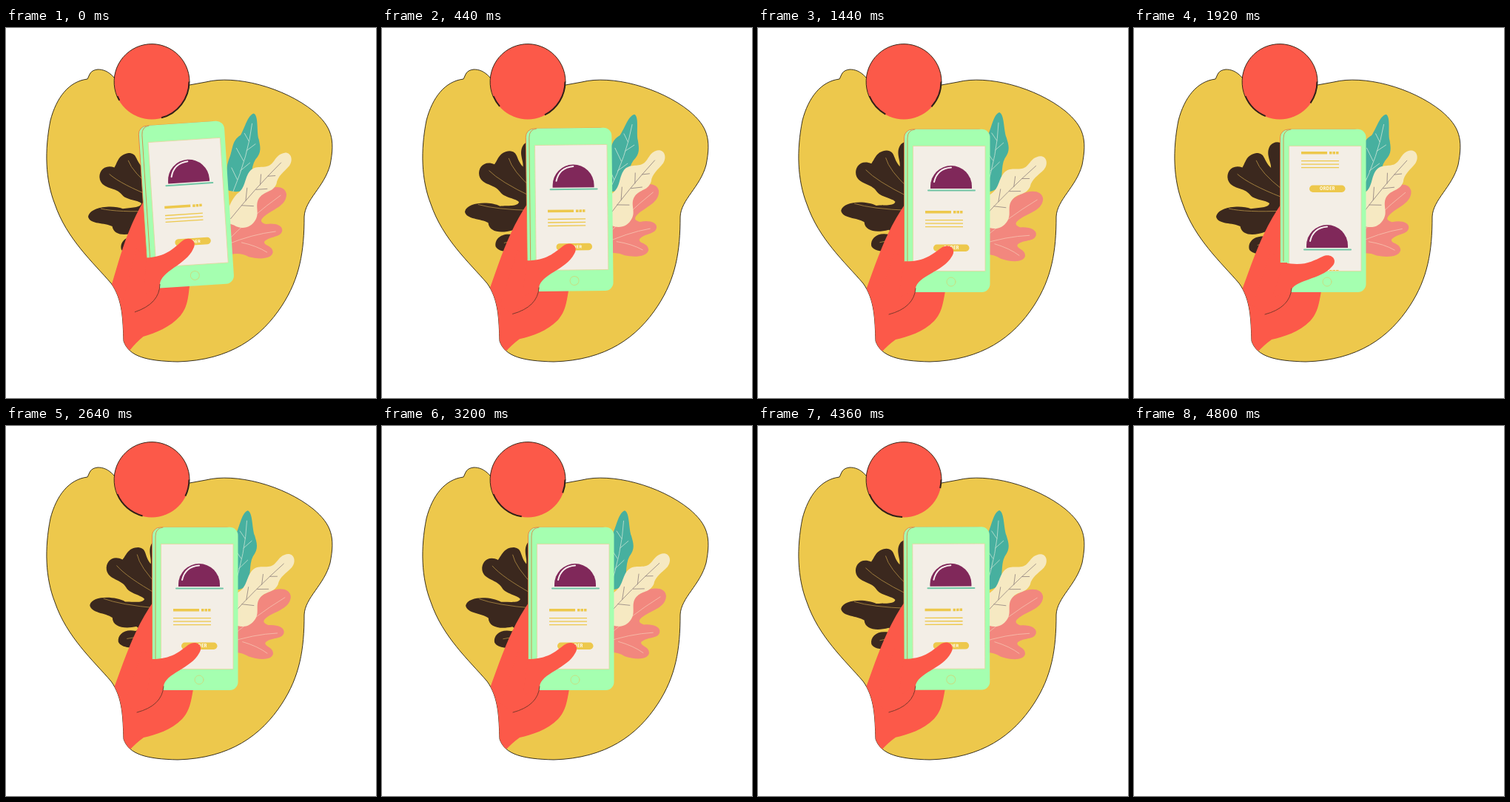
An HTML page that plays this animation: 500 by 500 pixels, repeating every 4.84 s.

```html
<!DOCTYPE html>
<html>
<head>
<meta charset="utf-8">
<style>
  html, body { margin: 0; width: 100%; height: 100%; overflow: hidden; background: #fff; }
  svg { display: block; width: 100vw; height: 100vh; }
  .line { fill: none; stroke-linecap: round; }
</style>
</head>
<body>
<svg viewBox="0 0 500 500">
  <defs>
    <path id="blob" d="M150,72C140,58 131,56 124,56C113,57 113,64 110,69C85,72 68,94 60,125C52,165 53,205 66,238C82,285 118,317 142,345C158,367 158,395 159,423C166,444 190,450 232,451C303,449 345,418 373,375C397,338 403,302 403,255C404,232 430,215 438,185C445,150 440,133 415,112C375,80 310,63 270,73L248,77Z"/>
    <clipPath id="blobClip"><use href="#blob"/></clipPath>
    <clipPath id="screenClip"><rect x="210" y="160" width="96.500" height="168"/></clipPath>
    <g id="item">
      <path fill="#80285a" d="M233,217V214A28,28 0 0 1 289,214V217Z"/>
      <path class="line" stroke="#f8eeee" stroke-width="2" d="M238,208Q242,190 261,188.500"/>
      <path class="line" stroke="#70c6a5" stroke-width="2" d="M230,219.500H293"/>
      <g fill="#edc84c">
        <path d="M226,247h35v3.500h-35zM264,247h3.500v3.500h-3.500zM268.500,247h3.500v3.500h-3.500zM273,247h3.500v3.500h-3.500z"/>
        <path d="M226,259h51v1.300h-51zM226,263.500h51v1.300h-51zM226,268h51v1.300h-51z"/>
        <rect x="237" y="292.500" width="48.500" height="9.500" rx="4.700"/>
      </g>
      <text x="261.500" y="299.200" text-anchor="middle" font-family="Inter, sans-serif" font-size="5.500" font-weight="700" letter-spacing=".4" fill="#fff">ORDER</text>
    </g>
  </defs>

  <g id="scene">
    <use href="#blob" fill="#edc84c" stroke="#251f10" stroke-width=".9"/>

    <g id="brown">
      <path fill="#3b281e" d="M230,275L222,160Q212,148 202,156C193,166 200,178 198,186C189,174 194,165 182,163C168,163 166,172 160,179C147,172 137,181 138,192C140,206 158,205 164,217C168,225 185,228 188,233C186,239 173,236 162,236C149,228 118,226 114,239C115,250 135,250 144,257C144,270 160,273 176,270Q182,273 175,276C160,272 150,280 151,290C155,299 170,299 195,300Z"/>
      <path class="line" stroke="#a3813f" stroke-width=".9" d="M152,187Q165,203 205,227M180,173Q183,190 208,217M133,231Q155,240 205,246M163,286L200,281"/>
    </g>

    <g id="teal">
      <path fill="#47b09f" d="M325,114C317,117 315,134 310,145C298,154 302,166 297,180C293,196 300,207 297,220Q312,225 325,216C332,203 327,188 333,176C341,165 338,158 335,148C331,139 332,116 325,114Z"/>
      <path class="line" stroke="#b8ddce" stroke-width=".9" d="M307,222Q323,170 324,128M311,205L302,190M314,193L326,181M317,179L306,163M320,165L331,155M322,152L315,142"/>
    </g>

    <g id="pink">
      <path fill="#f2877e" d="M295,310L300,260Q335,236 356,225C370,219 385,220 386,232C385,246 370,250 357,257C349,262 345,266 355,270C366,269 378,273 376,281C373,290 360,286 351,293C348,299 362,299 361,309C358,319 339,316 328,312Q312,302 295,310Z"/>
      <path class="line" stroke="#f6bcaa" stroke-width=".9" d="M295,293Q337,257 378,233M300,293Q335,282 367,281M320,292Q340,298 353,308"/>
    </g>

    <g id="cream">
      <path fill="#f6e9c2" d="M295,262Q301,237 314,225C326,218 325,206 332,197C340,187 350,193 359,190C368,187 369,175 382,174C391,174 393,185 387,192C379,200 370,205 368,215C362,227 352,223 344,232C336,241 343,252 337,261C329,274 315,273 307,267Z"/>
      <path class="line" stroke="#9b8d86" stroke-width=".9" d="M303,258Q337,221 376,187M319,241L335,243M325,235L328,218M340,221L355,221M346,215L348,201M357,204L367,204"/>
    </g>

    <g clip-path="url(#blobClip)">
      <g id="hand">
        <path fill="#fc5949" d="M130,390C152,350 162,290 200,236L254,350C250,372 249,384 238,396C223,411 203,417 186,421Q176,428 165,440L140,440Z"/>
        <rect x="197.500" y="137" width="112" height="219" rx="11" fill="#a5ffb0" stroke="#f0703f" stroke-width=".8"/>
        <rect x="201.500" y="136.700" width="112" height="220.300" rx="11" fill="#a5ffb0"/>
        <path class="line" stroke="#d77b3d" stroke-width=".8" d="M202,315V149Q202,138 212,137"/>
        <rect x="209.500" y="159.500" width="97.500" height="169" fill="#f3eee6" stroke="#e4d59c" stroke-width=".8"/>
        <g clip-path="url(#screenClip)">
          <g id="list"><use href="#item"/><use href="#item" y="160"/></g>
        </g>
        <circle class="line" cx="261" cy="343" r="6" stroke="#c4df85"/>
        <path fill="#fc5949" d="M185,300L197,317L207,317L213,352Q211,376 177,387L160,375Z"/>
        <path id="thumb" fill="#fc5949" d="M197,315C224,315 234,305 246,296C257,288 268,297 261,307C250,328 215,334 213,352L190,365Z"/>
        <path class="line" stroke="#713629" stroke-width=".9" d="M213,352Q211,378 177,387"/>
      </g>
    </g>

    <circle cx="197" cy="72.500" r="51" fill="#fc5949"/>
    <path class="line" stroke="#251f10" stroke-width=".9" d="M150,92.400A51,51 0 1 1 248,72.500"/>
    <circle id="ring" cx="197" cy="72.500" r="50.500" pathLength="360" fill="none" stroke="#302018" stroke-width="2"/>
  </g>
</svg>

<script>
const LOOP = 4840, STEP = 40, PITCH = 160;
const $ = id => document.getElementById(id);
const rotate = (id, angle, x, y) => $(id).setAttribute('transform', `rotate(${angle} ${x} ${y})`);

// Eased 0 to 1 between two times
function ramp(t, from, to) {
  const k = Math.min(1, Math.max(0, (t - from) / (to - from)));
  return k * k * (3 - 2 * k);
}

// Cosine with its crest at the given time
const wave = (t, period, crest) => Math.cos(2 * Math.PI * (t - crest) / period);

function draw(t) {
  $('scene').style.display = t >= LOOP - STEP ? 'none' : '';

  const sway = .45 + .6 * wave(t, 1700, 2050);
  rotate('teal', 8.7 * sway, 315, 220);
  rotate('cream', -6.3 * sway, 300, 250);
  rotate('pink', -8 * sway, 295, 310);
  rotate('brown', -4.8 - 4.7 * wave(t, LOOP / 2.5, 0), 210, 265);

  const upright = ramp(t, 0, 600) - ramp(t, 4300, 4800);
  rotate('hand', 3.7 * (upright - 1), 125, 427);

  const swipe = ramp(t, 1320, 1880) - ramp(t, 1960, 2440);
  rotate('thumb', 12 * swipe, 190, 345);
  $('list').setAttribute('transform', `translate(0 ${-PITCH * ramp(t, 1560, 2280)})`);

  // The gap in the dark rim drifts round and slows down
  const decay = Math.exp(-t / 2500);
  const right = 75 * decay, left = 80 + 70 * decay;
  $('ring').setAttribute('stroke-dasharray', `${right} ${left - right} ${157 - left} 500`);
}

const start = performance.now();
function tick() {
  const t = (performance.now() - start) % LOOP;
  draw(Math.floor(t / STEP) * STEP);
  requestAnimationFrame(tick);
}
tick();
</script>
</body>
</html>
```
